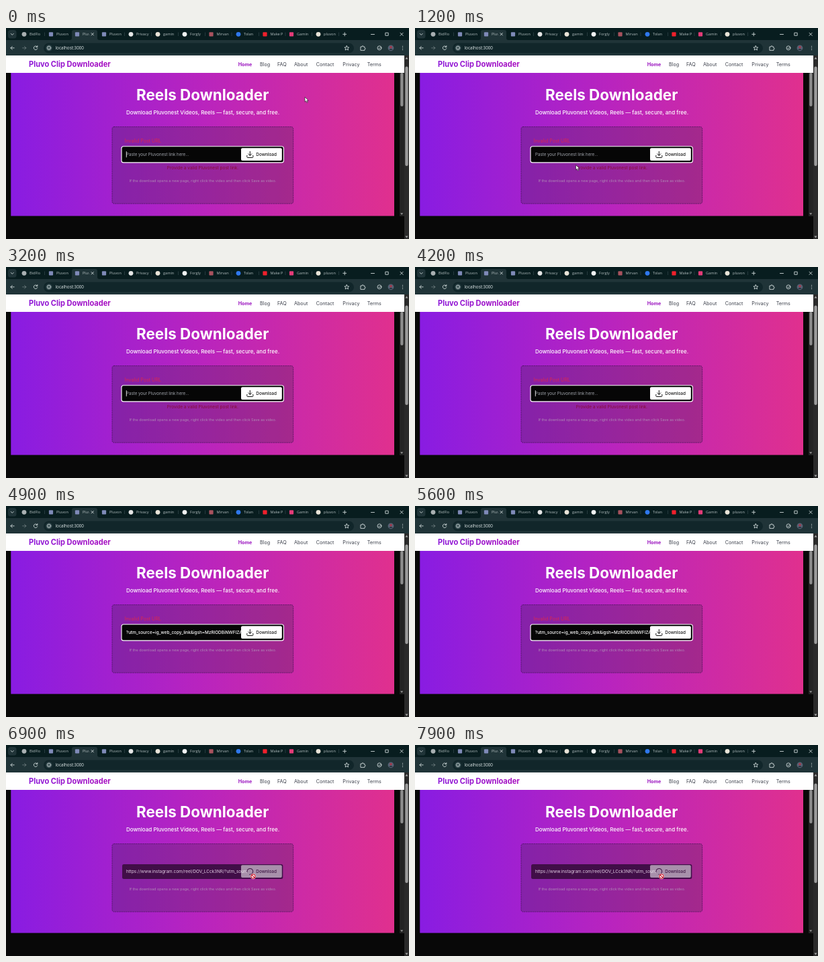
An HTML page for the animation above (8 s loop, 600 by 315 pixels).

```html
<!DOCTYPE html>
<html lang="en">
<head>
<meta charset="utf-8">
<title>Clip downloader</title>
<style>
  html, body { margin: 0; width: 100%; height: 100%; overflow: hidden; background: #080808; }
  svg { display: block; width: 600px; height: 315px; }
  text { font-family: Inter, Roboto, sans-serif; white-space: pre; }
  .tab { font: 5.6px "Open Sans", "Noto Sans", sans-serif; fill: #b4bfc0; }
  .nav { font-size: 7.2px; fill: #3b3f4a; }
  .line { fill: none; stroke: #cfd8d9; stroke-width: .9; stroke-linecap: round; stroke-linejoin: round; }
  .ink { fill: none; stroke: #151515; stroke-width: 1; stroke-linecap: round; stroke-linejoin: round; }
</style>
</head>
<body>
<svg viewBox="0 0 600 315">
  <defs>
    <linearGradient id="heroFill">
      <stop offset="0" stop-color="#891ce2"/>
      <stop offset=".5" stop-color="#b924be"/>
      <stop offset="1" stop-color="#e0308e"/>
    </linearGradient>
    <linearGradient id="brandFill">
      <stop offset="0" stop-color="#8c16d8"/>
      <stop offset="1" stop-color="#a80fc0"/>
    </linearGradient>
    <clipPath id="tabClip"><rect x="114" y="0" width="9.5" height="18"/></clipPath>
    <clipPath id="fieldClip"><rect x="178" y="178" width="172" height="22"/></clipPath>
    <clipPath id="busyClip"><rect x="178" y="178" width="180.5" height="22"/></clipPath>
  </defs>

  <!-- browser frame -->
  <rect width="600" height="19" fill="#081d1f"/>
  <rect y="18" width="600" height="23" fill="#203438"/>
  <path d="M95 18q3 0 3-3V6q0-3 3-3h32q3 0 3 3v9q0 3 3 3z" fill="#203438"/>
  <rect x="3" y="3" width="12.5" height="12.5" rx="3.5" fill="#203438"/>
  <path class="line" d="M7.3 8.4l2 2 2-2"/>
  <g id="tabs"></g>
  <path class="line" d="M127 7.5l3.4 3.4m0-3.4l-3.4 3.4M501.7 9.3h5m-2.5-2.5v5M543.5 9.5h5M565.2 7.2h4v4h-4zM587 7.2l4.2 4.2m0-4.2l-4.2 4.2"/>
  <rect x="56" y="22.5" width="462" height="15" rx="7.5" fill="#11262a"/>
  <path class="line" d="M12.2 29.8H7m2.3-2.4L7 29.8l2.3 2.4"/>
  <path class="line" opacity=".4" d="M24.6 29.8h5.2m-2.3-2.4l2.3 2.4-2.3 2.4"/>
  <path class="line" d="M46.5 28.2a2.8 2.8 0 1 0 .3 2.4M46.8 26.5v2h-2"/>
  <circle cx="64" cy="29.8" r="4.8" fill="#2c4247"/>
  <circle class="line" cx="64" cy="29.8" r="2.7"/>
  <path class="line" d="M64 29.6v1.2"/>
  <text x="73.5" y="32.1" style="font:6.3px 'Open Sans',sans-serif" fill="#e4ecec">localhost:3000</text>
  <path class="line" d="M507.3 26.6l1 2.2 2.4.2-1.8 1.6.6 2.4-2.2-1.3-2.2 1.3.6-2.4-1.8-1.6 2.4-.2z"/>
  <path class="line" d="M528.3 28h1.8q0-1.4 1-1.4t1 1.4h1.8v1.8q1.2 0 1.2 1t-1.2 1v1.6h-5.6z"/>
  <circle class="line" cx="556" cy="29.8" r="3"/>
  <path class="line" d="M554.7 30l1 1 2-2.2"/>
  <circle cx="573" cy="29.8" r="4.4" fill="#566274"/>
  <circle cx="573" cy="28.6" r="1.9" fill="#9e3a4e"/>
  <path d="M570 33q3-4 6 0z" fill="#26323c"/>
  <path class="line" style="stroke-width:1.3" d="M590.5 27.3v.01M590.5 29.8v.01M590.5 32.3v.01"/>

  <!-- page -->
  <rect y="41" width="593" height="26" fill="#fff"/>
  <text x="34" y="58" font-size="11.05" font-weight="700" fill="url(#brandFill)">Pluvo Clip Downloader</text>
  <g id="nav"></g>
  <rect x="7.3" y="67" width="570.7" height="213.6" fill="url(#heroFill)"/>
  <text x="292.7" y="108.2" text-anchor="middle" font-size="22.4" font-weight="700" fill="#fff">Reels Downloader</text>
  <text x="293" y="128.8" text-anchor="middle" font-size="8" font-weight="500" fill="#fff">Download Pluvonest Videos, Reels — fast, secure, and free.</text>

  <!-- scroll bars -->
  <rect x="586" y="67" width="7" height="214" fill="#242424"/>
  <rect x="587.3" y="67" width="4.2" height="50" rx="2" fill="#8e8e8e"/>
  <path d="M587.2 276.3h4l-2 2.8z" fill="#9a9a9a"/>
  <rect x="593" y="41" width="7" height="274" fill="#2a2a2a"/>
  <rect x="594.3" y="57.5" width="4.4" height="148.5" rx="2.2" fill="#9c9c9c"/>
  <path d="M594.4 46.6h4.2l-2.1-3zM594.4 310.4h4.2l-2.1 3z" fill="#a4a4a4"/>

  <!-- card -->
  <rect id="card" x="158" y="147.5" width="269.7" rx="3" fill="#33273f" fill-opacity=".26" stroke="#3c1150" stroke-width=".8" stroke-dasharray="1.6 1.1"/>
  <text id="invalid" x="176.6" y="170.7" font-size="7.1" fill="#d92850">Invalid Post URL</text>
  <text id="provide" x="293" y="211.2" text-anchor="middle" font-size="6.5" fill="#860b36">Provide a valid Pluvonest post link.</text>
  <text id="note" x="292.9" text-anchor="middle" font-size="5.46" fill="#b08ab6">If the download opens a new page, right click the video and then click Save as video.</text>

  <g id="ready">
    <rect x="172" y="176.7" width="241.4" height="24.2" rx="3" fill="#060606" stroke="#fff" stroke-width="1.1"/>
    <text id="hint" x="179" y="191.2" font-size="6.2" fill="#a3a7ae">Paste your Pluvonest link here...</text>
    <path id="caret" d="M179.3 184.2v9" stroke="#fff" stroke-width=".8"/>
    <g clip-path="url(#fieldClip)">
      <text id="pasted" x="178.8" y="191.2" font-size="6.4" font-weight="500" fill="#fff">?utm_source=ig_web_copy_link&amp;igsh=MzRlODBiNWFlZA==</text>
    </g>
    <rect x="350" y="179.3" width="60.8" height="18.7" rx="2" fill="#fff"/>
    <path class="ink" d="M363.3 184.3v6m-2.5-2.4l2.5 2.5 2.5-2.5M358.8 190.3v2.3q0 .9.9.9h7.2q.9 0 .9-.9v-2.3"/>
    <text x="372.3" y="191.3" font-size="6.4" font-weight="500" fill="#151515">Download</text>
  </g>

  <g id="busy">
    <rect x="173" y="178" width="239.3" height="22" rx="2.5" fill="#410e48"/>
    <g clip-path="url(#busyClip)">
      <text x="179" y="191.2" font-size="6.4" fill="#e2cfe4">https://www.instagram.com/reel/DOV_LCck3NR/?utm_source</text>
    </g>
    <rect x="350" y="179.3" width="60.8" height="18.7" rx="2" fill="#fff" fill-opacity=".54"/>
    <g id="spinner"><path class="ink" d="M4.4 0A4.4 4.4 0 1 1 1.36-4.18" style="stroke:#3e1644"/></g>
    <text x="372.3" y="191.3" font-size="6.4" font-weight="500" fill="#3e1644">Download</text>
  </g>

  <path id="arrow" d="M0 0v7.3l1.7-1.5 1.2 2.7 1.3-.6-1.2-2.6h2.3z" fill="#fff" stroke="#111" stroke-width=".6"/>
  <g id="blocked" fill="none">
    <circle r="3.1" fill="#fff" stroke="#fff" stroke-width="2.2"/>
    <path d="M-2.1-2.1L2.1 2.1M3.1 0A3.1 3.1 0 1 1-3.1 0A3.1 3.1 0 1 1 3.1 0" stroke="#c4162c" stroke-width="1.3"/>
  </g>
</svg>
<script>
const LOOP = 8000, STEP = 100;
const PASTE = 4700, CLICK = 6300;
const $ = id => document.getElementById(id);
const show = (id, on) => { $(id).style.display = on ? '' : 'none'; };
const move = (id, [x, y]) => $(id).setAttribute('transform', `translate(${x} ${y})`);

function add(parent, tag, attrs, label) {
  const el = document.createElementNS('http://www.w3.org/2000/svg', tag);
  for (const key in attrs) el.setAttribute(key, attrs[key]);
  if (label) el.textContent = label;
  parent.append(el);
}

// icon x, icon colour, label, round icon
const tabs = [
  [27, '#a9b0b2', 'BidFlo', 1], [67, '#7f8ab8', 'Pluvon', 0], [106, '#7f8ab8', 'Pluvon', 0],
  [146, '#7f8ab8', 'Pluvon', 0], [186, '#e6e6e6', 'Privacy', 1], [226, '#e9e4d8', 'gamin', 1],
  [266, '#f1f3f3', 'Forgly', 1], [305.5, '#a8525e', 'Mirvan', 0], [346, '#2f78ee', 'Tolan', 1],
  [385.5, '#f0202c', 'Make P', 0], [425, '#e33b78', 'Gamin', 0], [465, '#e9e4d8', 'pluvon', 1]
];
tabs.forEach(([x, fill, label, round], i) => {
  const size = round ? 6.8 : 6.2;
  add($('tabs'), 'rect', { x: x - size / 2, y: 9.3 - size / 2, width: size, height: size, rx: round ? size / 2 : 1, fill });
  const attrs = { x: x + 8, y: 11.4, class: 'tab' };
  if (i === 2) attrs['clip-path'] = 'url(#tabClip)';
  add($('tabs'), 'text', attrs, label);
  if (i !== 1 && i !== 2) add($('tabs'), 'path', { d: `M${x + 30.5} 6.5v5.5`, stroke: '#344a4e', 'stroke-width': .7 });
});

[['Home', 345.7], ['Blog', 378], ['FAQ', 404], ['About', 429], ['Contact', 461.7], ['Privacy', 501.3], ['Terms', 537.7]]
  .forEach(([label, x], i) => add($('nav'), 'text',
    { x, y: 56.7, class: 'nav', style: i ? '' : 'fill:#9c16c0;font-weight:700' }, label));

// time, x, y of the pointer tip
const firstPath = [[0, 445, 103], [200, 440, 107], [900, 252, 200], [1200, 239.5, 204.5], [1400, 238, 203], [1600, 237, 197]];
const secondPath = [[5800, 310, 212], [6100, 360, 195], [6300, 365, 192]];
const blockedPath = [[6300, 367, 195.5], [6900, 368, 196], [7400, 367, 196], [8000, 367, 196]];

function along(path, t) {
  const i = path.findIndex(p => p[0] > t);
  if (i < 1) return path[i < 0 ? path.length - 1 : 0].slice(1);
  const [t0, x0, y0] = path[i - 1], [t1, x1, y1] = path[i];
  const k = (t - t0) / (t1 - t0), e = k * k * (3 - 2 * k);
  return [x0 + (x1 - x0) * e, y0 + (y1 - y0) * e];
}

function draw(t) {
  const pasted = t >= PASTE, busy = t >= CLICK;
  show('ready', !busy);
  show('busy', busy);
  show('invalid', !busy);
  show('provide', !pasted);
  show('hint', !pasted);
  show('pasted', pasted);
  show('caret', !pasted && (t + 460) % 1060 < 530);
  $('card').setAttribute('height', pasted ? 101.5 : 114.7);
  $('note').setAttribute('y', pasted ? 217.1 : 230.2);
  $('spinner').setAttribute('transform', `translate(363.3 188.8) rotate(${t * .36 - 153})`);

  const early = t < 1600;
  show('arrow', early || (t >= 5800 && !busy));
  move('arrow', along(early ? firstPath : secondPath, t));
  show('blocked', busy);
  move('blocked', along(blockedPath, t));
}

const start = performance.now();
function tick() {
  const t = (performance.now() - start) % LOOP;
  draw(Math.floor(t / STEP) * STEP);
  requestAnimationFrame(tick);
}
tick();
</script>
</body>
</html>
```
